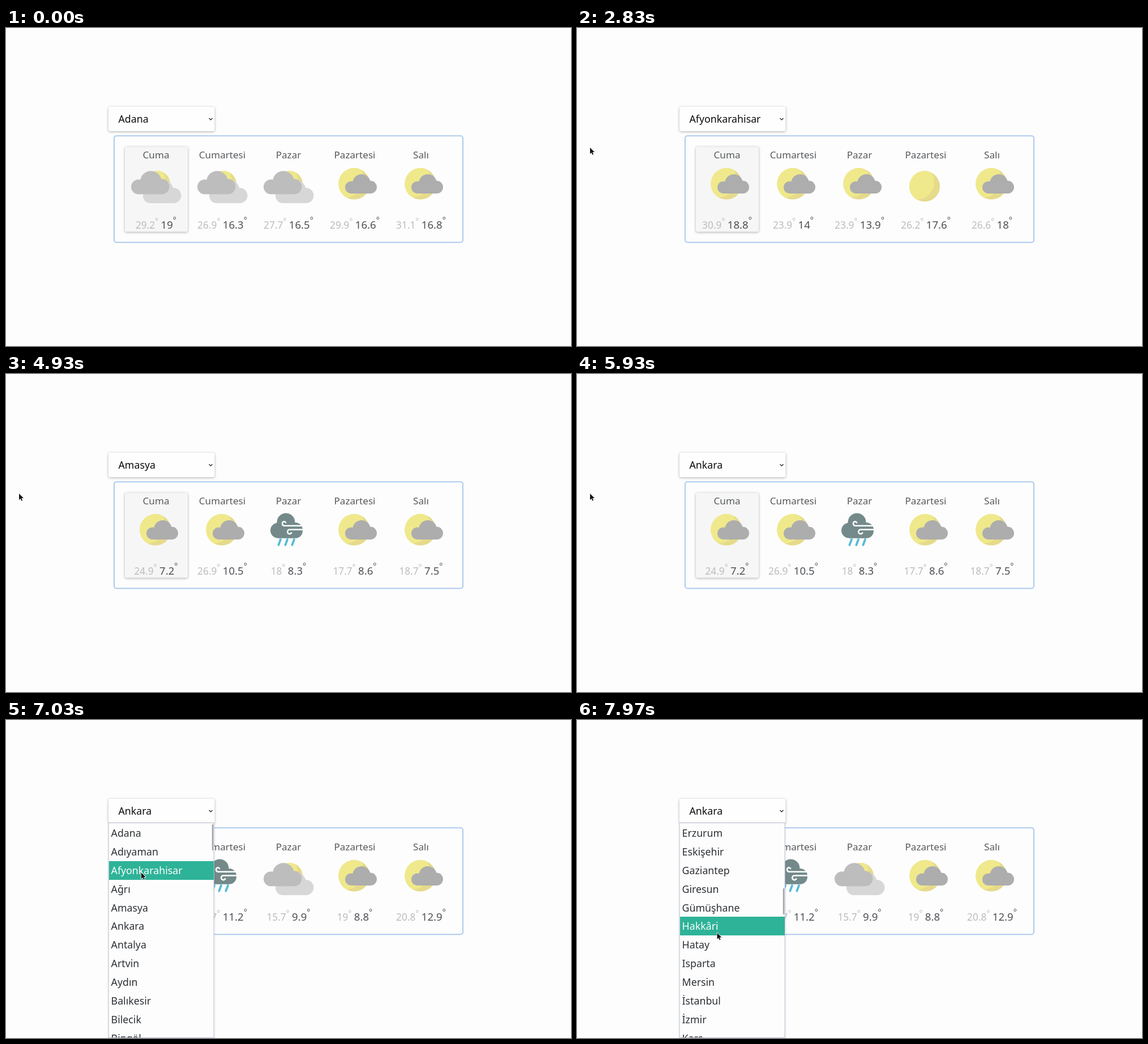
These frames come from a looping animation (998 by 561 pixels, 8 s). An HTML page with a canvas:

```html
<!DOCTYPE html>
<html lang="tr">
<head>
<meta charset="utf-8">
<title>Hava durumu</title>
<style>
  html, body { margin: 0; width: 100%; height: 100%; overflow: hidden; background: #fdfdfd; }
  canvas { display: block; }
</style>
</head>
<body>
<canvas id="stage" width="998" height="561"></canvas>
<script>
const ctx = document.getElementById('stage').getContext('2d');
const LOOP = 8000, BG = '#fdfdfd', ROW = 32.87, LIST_TOP = 183;
const FONT = '"Noto Sans", "Open Sans", sans-serif';

const days = ['Cuma', 'Cumartesi', 'Pazar', 'Pazartesi', 'Salı'];
const cities = ('Adana Adıyaman Afyonkarahisar Ağrı Amasya Ankara Antalya Artvin Aydın Balıkesir ' +
  'Bilecik Bingöl Bitlis Bolu Burdur Bursa Çanakkale Çankırı Çorum Denizli Diyarbakır Edirne ' +
  'Elazığ Erzincan Erzurum Eskişehir Gaziantep Giresun Gümüşhane Hakkâri Hatay Isparta Mersin ' +
  'İstanbul İzmir Kars Kastamonu Kayseri').split(' ');

// Start time, value
const selected = [[0, 'Adana'], [700, 'Adıyaman'], [2600, 'Afyonkarahisar'],
  [3450, 'Ağrı'], [4400, 'Amasya'], [5820, 'Ankara']];

// Start time, icons per day, "high/low" per day
const forecasts = [
  [0, 'BBBAA', '29.2/19 26.9/16.3 27.7/16.5 29.9/16.6 31.1/16.8'],
  [1630, 'AAASA', '30.9/18.8 23.9/14 23.9/13.9 26.2/17.6 26.6/18'],
  [3150, 'AAAAA', '24.6/9.8 18.2/10.1 19.3/8.7 21.5/9.4 23.4/10.6'],
  [3980, 'AACAA', '24.9/7.2 26.9/10.5 18/8.3 17.7/8.6 18.7/7.5'],
  [6250, 'ACBAA', '22.4/11.8 13.7/11.2 15.7/9.9 19/8.8 20.8/12.9']
];

// Time, x, y of the pointer tip
const pointerPath = [[100, -14, 262], [600, 23, 211], [5950, 23, 211], [6420, 225.5, 171],
  [6680, 225.5, 171], [7360, 251, 358], [7500, 251, 358], [7900, 247.5, 375.5]];
const OPEN_AT = 6500, SCROLL_FROM = 7470, NOTCH = 62;

const current = (list, t) => list.filter(item => item[0] <= t).pop();

function pointerAt(t) {
  const i = pointerPath.findIndex(p => p[0] > t);
  if (i === 0) return [-50, 0];
  if (i < 0) return pointerPath[pointerPath.length - 1].slice(1);
  const [t0, x0, y0] = pointerPath[i - 1], [t1, x1, y1] = pointerPath[i];
  const u = (t - t0) / (t1 - t0), k = u * u * (3 - 2 * u);
  return [x0 + (x1 - x0) * k, y0 + (y1 - y0) * k];
}

function text(str, x, y, size, color, align = 'left') {
  ctx.font = `${size}px ${FONT}`;
  ctx.fillStyle = color;
  ctx.textAlign = align;
  ctx.fillText(str, x, y);
  return ctx.measureText(str).width;
}

function disc(x, y, r, color) {
  ctx.fillStyle = color;
  ctx.beginPath();
  ctx.arc(x, y, r, 0, 7);
  ctx.fill();
}

function box(x, y, w, h, r, color) {
  ctx.fillStyle = color;
  ctx.beginPath();
  ctx.roundRect(x, y, w, h, r);
  ctx.fill();
}

function raised(x, y, w, h, color) {
  ctx.save();
  ctx.shadowColor = 'rgba(0,0,0,.32)';
  ctx.shadowBlur = 4;
  ctx.shadowOffsetY = 1;
  box(x, y, w, h, 3, color);
  ctx.restore();
}

function line(d, color, width) {
  ctx.strokeStyle = color;
  ctx.lineWidth = width;
  ctx.lineCap = ctx.lineJoin = 'round';
  ctx.stroke(new Path2D(d));
}

function sun(x, y, r) {
  ctx.save();
  ctx.beginPath();
  ctx.arc(x, y, r, 0, 7);
  ctx.clip();
  disc(x, y, r + 1, '#e6da8b');
  disc(x - r * .52, y - r * .28, r * 1.15, '#efe98b');
  ctx.restore();
}

// Left lobe, top lobe, right lobe on a flat base
function cloud(x, y, s, color) {
  disc(x + 13 * s, y + 28 * s, 13 * s, color);
  disc(x + 35 * s, y + 19 * s, 19 * s, color);
  disc(x + 54 * s, y + 27.5 * s, 13.5 * s, color);
  box(x + 13 * s, y + 25 * s, 41 * s, 16 * s, 0, color);
}

const icons = {
  S(x) { sun(x - 2, 279.3, 27); },
  A(x) {
    sun(x - 1, 274.8, 27.7);
    cloud(x - 17, 258, .83, '#adadad');
  },
  B(x) {
    sun(x + 2, 275, 23);
    cloud(x - 23, 268, 1, '#d7d7d7');
    cloud(x - 44, 252.3, 1, '#bdbdbd');
  },
  C(x) {
    const c = '#748a8a';
    disc(x - 4.5, 261.5, 16, c);
    disc(x - 18.5, 276, 13.5, c);
    box(x - 18, 262, 43, 27.8, [0, 13, 13, 0], c);
    ctx.save();
    ctx.translate(x, 0);
    line('M26 267.7H-8a3.8 3.8 0 0 1 0-7.4q2.3 0 3 1.8', '#fdfdfd', 2.6);
    line('M26 274.5H2a3.8 3.8 0 0 0 0 7.6q2.4 0 3.2-2', '#fdfdfd', 2.6);
    for (const d of [-14, -2, 10]) line(`M${d} 292l-3.6 9.6`, '#57bbd6', 3.8);
    ctx.restore();
  }
};

function temperatures(pair, x) {
  const [high, low] = pair.split('/');
  const parts = [[high, 17.3, 353.5, '#bcbcbc', 0], ['°', 13.5, 345.8, '#bcbcbc', 4.6],
    [low, 18.6, 353.5, '#4d4f53', 0], ['°', 14.5, 344.2, '#4d4f53', 0]];
  let total = 0;
  for (const [str, size, , , gap] of parts) {
    ctx.font = `${size}px ${FONT}`;
    total += ctx.measureText(str).width + gap;
  }
  let left = x - total / 2;
  for (const [str, size, y, color, gap] of parts) left += text(str, left, y, size, color) + gap;
}

function panel(t) {
  ctx.strokeStyle = '#adcbed';
  ctx.lineWidth = 2;
  ctx.beginPath();
  ctx.roundRect(191, 190.3, 616, 188, 4);
  ctx.stroke();
  raised(210, 209.5, 111, 150, '#f6f6f6');

  const [, sky, temps] = current(forecasts, t);
  temps.split(' ').forEach((pair, i) => {
    const x = 265 + 117 * i;
    text(days[i], x, 230, 17.1, '#57595c', 'center');
    icons[sky[i]](x);
    temperatures(pair, x);
  });
}

function selectBox(t) {
  raised(181, 139, 187.5, 43, '#fefefe');
  text(current(selected, t)[1], 198.5, 167.3, 17.75, '#0c0c0c');
  line('M359 159.5l2.6 2.6l2.6-2.6', '#222', 1.3);
}

function dropdown(t, pointerY) {
  const notches = t < SCROLL_FROM ? 0 : Math.min(8, 1 + Math.floor((t - SCROLL_FROM) / NOTCH));
  const first = notches * 3;
  const hover = pointerY > LIST_TOP ? Math.floor((pointerY - LIST_TOP) / ROW) : -1;

  ctx.save();
  ctx.shadowColor = 'rgba(0,0,0,.15)';
  ctx.shadowBlur = 3;
  box(181, 181, 186.5, 380, 0, BG);
  ctx.restore();
  ctx.strokeStyle = '#bcc0d6';
  ctx.lineWidth = 1;
  ctx.strokeRect(181.5, 181.5, 185.5, 379);

  ctx.save();
  ctx.beginPath();
  ctx.rect(182, 182, 185, 378);
  ctx.clip();
  for (let i = 0; i < 12; i++) {
    const y = LIST_TOP + i * ROW;
    if (i === hover) box(182, Math.round(y), 185, 33, 0, '#2eb398');
    text(cities[first + i], 185.6, y + 23.1, 17.75, i === hover ? '#fcfcfc' : '#2c3034');
  }
  box(363.8, 184 + first * 4.71, 2.4, 46, 1, '#a3a5a8');
  ctx.restore();
}

function pointer(x, y) {
  ctx.save();
  ctx.translate(x, y);
  const arrow = 'M0 0V11.2L2.6 8.8L4.3 12.8L6.1 12L4.4 8.1H8Z';
  line(arrow, '#fff', 1.6);
  ctx.fillStyle = '#161616';
  ctx.fill(new Path2D(arrow));
  ctx.restore();
}

function draw(t) {
  const [px, py] = pointerAt(t);
  box(0, 0, 998, 561, 0, BG);
  panel(t);
  selectBox(t);
  if (t >= OPEN_AT) dropdown(t, py);
  pointer(px, py);
}

const start = performance.now();
function tick() {
  draw((performance.now() - start) % LOOP);
  requestAnimationFrame(tick);
}
tick();
</script>
</body>
</html>
```
